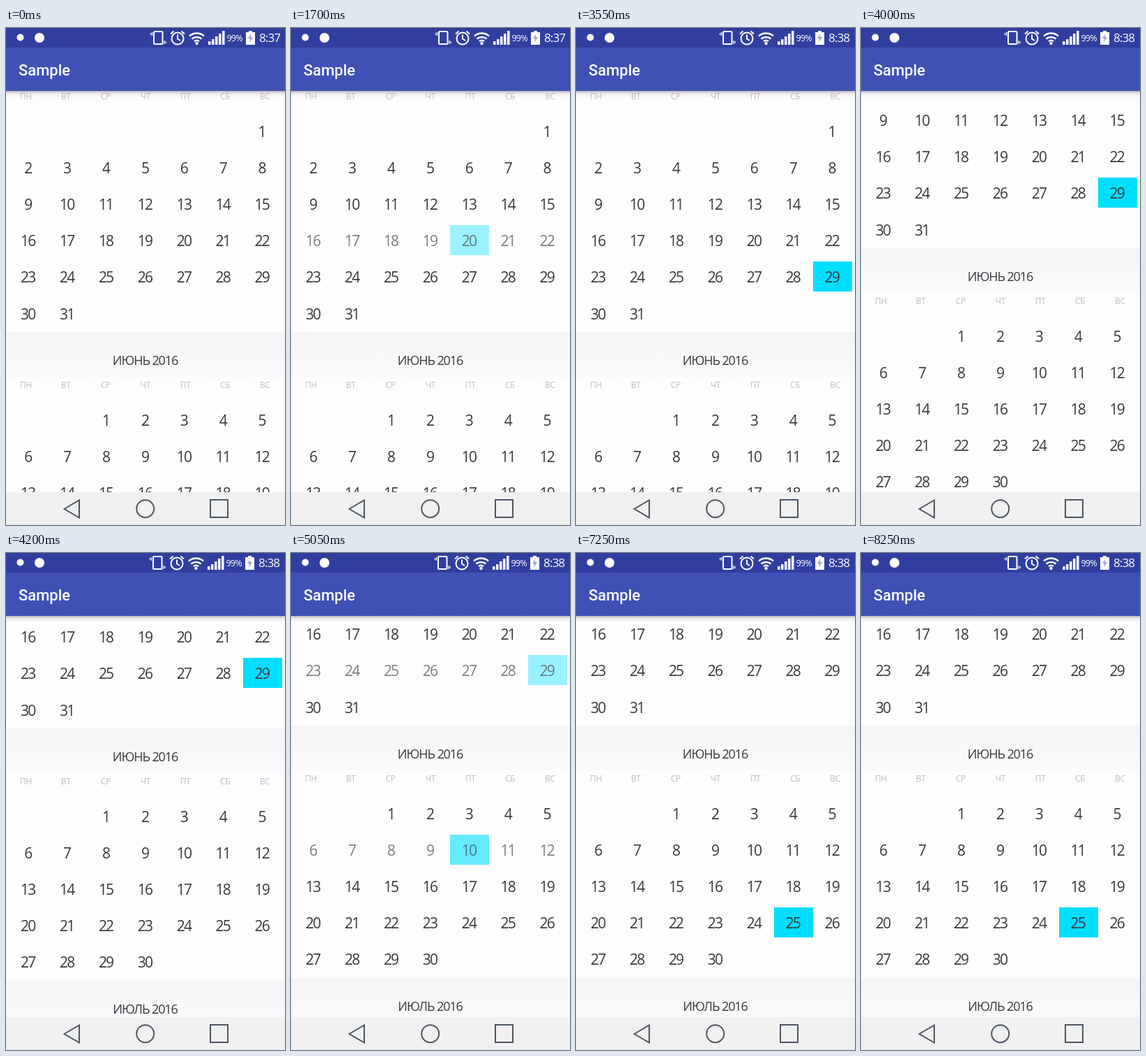
Animation of 400x711 px, one loop 9.25 s. Source, as an HTML page:

```html
<!DOCTYPE html>
<html lang="ru">
<head>
<meta charset="utf-8">
<title>Sample</title>
<style>
html, body { margin: 0; width: 100%; height: 100%; overflow: hidden; background: #fdfdfe; }
svg { display: block; width: 400px; height: 711px; }
text { font-family: "Open Sans", "Noto Sans", sans-serif; fill: #38383e; }
.mid { text-anchor: middle; }
.day { font-size: 21px; letter-spacing: -1.8px; }
.title { font-size: 18px; letter-spacing: -1.1px; }
.week { font-size: 12px; letter-spacing: -.3px; fill: #c0bdcb; }
.zone { fill: url(#fade); }
.mark { fill: #00deff; shape-rendering: crispEdges; }
.bar text { fill: #fff; }
.bar .app { font: 500 22px Roboto, sans-serif; }
.line { fill: none; stroke: #fff; stroke-width: 2; }
.solid { fill: #fff; }
.nav { fill: none; stroke: #4c5662; stroke-width: 2; }
</style>
</head>
<body>
<svg viewBox="0 0 400 711">
  <defs>
    <linearGradient id="shade" x1="0" y1="0" x2="0" y2="1">
      <stop offset="0" stop-color="#404050" stop-opacity=".4"/>
      <stop offset=".35" stop-color="#606070" stop-opacity=".12"/>
      <stop offset="1" stop-color="#808090" stop-opacity="0"/>
    </linearGradient>
    <linearGradient id="fade" x1="0" y1="0" x2="0" y2="1">
      <stop offset="0" stop-color="#f5f5f7"/>
      <stop offset="1" stop-color="#fafafc"/>
    </linearGradient>
  </defs>
  <rect width="400" height="711" fill="#fdfdfe"/>
  <g id="list"></g>

  <rect y="90" width="400" height="10" fill="url(#shade)"/>
  <g class="bar">
    <rect width="400" height="28" fill="#303f9f"/>
    <rect y="28" width="400" height="62" fill="#3f51b5"/>
    <text class="app" x="18" y="67.5">Sample</text>
    <circle class="solid" cx="20.5" cy="13.5" r="5"/>
    <circle class="solid" cx="48" cy="14" r="7"/>
    <g id="status">
      <g class="line">
        <rect x="212" y="5" width="12.5" height="18" rx="1.5"/>
        <path stroke-width="1.2" d="M209.5 6v5M207.5 7v3M227 18v5M229 19v3"/>
        <circle cx="246" cy="15" r="8.5"/>
        <path d="M246 9.5v6l4 2.5M236 8.500l4.500-4M256 8.500l-4.500-4"/>
        <path stroke-width="2.6" d="M263 11.500a16 16 0 0 1 21 0M266.500 15.500a11 11 0 0 1 14 0M270 19a6 6 0 0 1 7 0"/>
      </g>
      <circle class="solid" cx="273.5" cy="22" r="2.2"/>
      <path class="solid" d="M290 24v-5h3.500v5zM295 24v-8h3.500v8zM300 24v-12h3.500v12zM305 24v-16h3.500v16zM310 24v-20h3.500v20z"/>
      <text x="316.5" y="18.5" font-size="12.5" letter-spacing="-.8">99%</text>
      <path class="solid" d="M348 4h5v2h4v18h-13v-18h4z"/>
      <path d="M351.500 8l-4.500 7h3l-1 6 5-8h-3.500z" fill="#9aa2cc"/>
      <text id="clock" x="363" y="20" font-size="17" letter-spacing="-.9">8:37</text>
    </g>
  </g>

  <rect y="664" width="400" height="47" fill="#f0f0f1"/>
  <g class="nav">
    <path d="M83.500 688L105 675.500v25z"/>
    <circle cx="199.7" cy="687.7" r="12.5"/>
    <rect x="293" y="675" width="25" height="25"/>
  </g>
</svg>
<script>
const LOOP = 9250, STEP = 50, FADE = 250;
const ROW = 52.1, COL = 55.9, SCROLL = 188;
const WEEK = ['ПН', 'ВТ', 'СР', 'ЧТ', 'ПТ', 'СБ', 'ВС'];
const MONTHS = [
  { id: 'may', name: 'МАЙ', y: 62, first: 6, days: 31 },
  { id: 'jun', name: 'ИЮНЬ', y: 475, first: 2, days: 30 },
  { id: 'jul', name: 'ИЮЛЬ', y: 836, first: 4, days: 31 }
];
// A fade stalls at "hold" and jumps to its end at "done".
const PICKS = [
  { to: 'may20', at: 1605, hold: 1700, done: 2200 },
  { from: 'may20', to: 'may28', at: 2470 },
  { from: 'may28', to: 'may29', at: 3275 },
  { from: 'may29', to: 'jun10', at: 4900 },
  { from: 'jun10', to: 'jun25', at: 5725, hold: 5900, done: 6200 }
];

const $ = id => document.getElementById(id);
const list = $('list'), marks = {}, rows = {};

function add(parent, tag, attrs, text) {
  const el = document.createElementNS('http://www.w3.org/2000/svg', tag);
  for (const k in attrs) el.setAttribute(k, attrs[k]);
  if (text !== undefined) el.textContent = text;
  return parent.appendChild(el);
}

const picked = new Set(PICKS.map(p => p.to));

for (const m of MONTHS) {
  add(list, 'rect', { class: 'zone', x: 0, y: m.y - 40, width: 400, height: 65 });
  add(list, 'text', { class: 'mid title', x: 199.5, y: m.y + 6.5 }, m.name + ' 2016');
  WEEK.forEach((w, i) =>
    add(list, 'text', { class: 'mid week', x: 28.5 + i * 57.15, y: m.y + 39.5 }, w));
  let row;
  for (let d = 1; d <= m.days; d++) {
    const cell = m.first + d - 1, c = cell % 7, r = Math.floor(cell / 7);
    const x = 32.2 + c * COL, y = m.y + 86 + r * ROW, id = m.id + d;
    if (d === 1 || c === 0) row = add(list, 'g', {});
    if (picked.has(id)) {
      marks[id] = add(list, 'rect', {
        class: 'mark', x: Math.round(x - 28), y: Math.round(y - 22.3),
        width: 56, height: 43, opacity: 0
      });
      list.insertBefore(marks[id], row);
      rows[id] = row;
    }
    // Tight tracking also trims the last digit, so pull the text back.
    add(row, 'text', { class: 'mid day', x: x - 0.9, y: y + 8 }, d);
  }
}

const clamp = v => Math.max(0, Math.min(1, v));

function progress(p, t) {
  if (p.done && t >= p.done) return 1;
  return clamp((Math.min(t, p.hold || t) - p.at) / FADE);
}

function draw(now) {
  const t = Math.floor(now % LOOP / STEP) * STEP;

  const level = {}, dim = new Map(Object.values(rows).map(r => [r, 1]));
  for (const p of PICKS) {
    const k = progress(p, t);
    level[p.to] = k;
    if (p.from && k > 0) level[p.from] = 1 - k;
    for (const id of [p.from, p.to])
      if (id) dim.set(rows[id], Math.min(dim.get(rows[id]), 1 - 1.5 * k * (1 - k)));
  }
  for (const id in marks) marks[id].setAttribute('opacity', level[id]);
  dim.forEach((v, row) => row.setAttribute('opacity', v));

  const s = SCROLL * (1 - Math.pow(1 - clamp((t - 3850) / 450), 2.5));
  list.setAttribute('transform', `translate(0 ${-Math.round(s)})`);

  const late = t >= 3200;
  $('clock').textContent = late ? '8:38' : '8:37';
  $('status').setAttribute('transform', `translate(${late ? -1 : 0} 0)`);
}

function tick() {
  draw(performance.now());
  requestAnimationFrame(tick);
}
tick();
</script>
</body>
</html>
```
